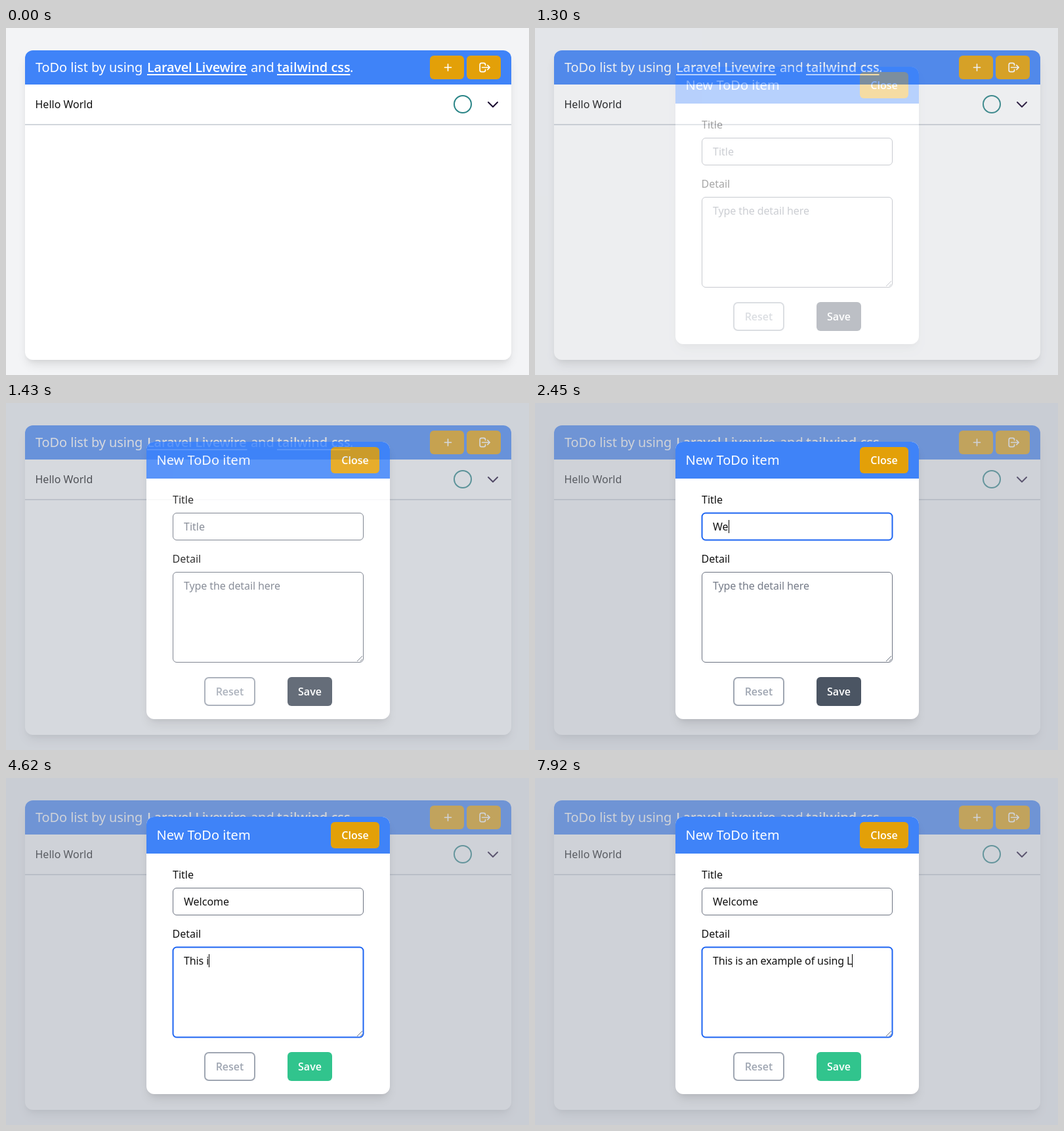
Write an HTML page that moves like this. It is 797x528 px and loops after 8000 ms.

```html
<!DOCTYPE html>
<html lang="en">
<head>
<meta charset="utf-8">
<title>ToDo list</title>
<style>
  html, body { margin: 0; width: 100%; height: 100%; overflow: hidden; background: #f3f4f6; }
  .panel, .shade, svg { position: absolute; }
  .panel {
    background: #fff; border-radius: 12px;
    box-shadow: 0 10px 15px -3px rgba(0,0,0,.1), 0 4px 6px -2px rgba(0,0,0,.05);
  }
  .list { left: 29px; top: 34px; width: 741px; height: 471px; }
  .form { left: 214px; top: 59px; width: 371px; height: 422px; }
  .shade { inset: 0; background: #9fa6b2; opacity: .5; }
  #dialog { position: absolute; inset: 0; opacity: 0; }
  svg { left: 0; top: 0; }
  text { font: 16px "Noto Sans", "Open Sans", sans-serif; white-space: pre; fill: #111; }
  .big { font-size: 20px; fill: #fff; }
  .big.run { letter-spacing: -.1px; }
  .link, .label { font-family: "Open Sans", "Noto Sans", sans-serif; font-weight: 600; }
  .label { fill: #fff; text-anchor: middle; }
  .hint { fill: #757b88; }
  .long { letter-spacing: -.1px; }
  .blue { fill: #3f83f8; }
  .amber { fill: #e3a008; }
  .icon { fill: none; stroke: #fff; stroke-width: 2; stroke-linecap: round; stroke-linejoin: round; }
  .field { fill: #fff; stroke: #6b7280; }
  .field.focus { stroke: #1c64f2; stroke-width: 2; }
</style>
</head>
<body>
<div class="panel list"></div>
<svg width="797" height="528">
  <path class="blue" d="M29 86V46a12 12 0 0 1 12-12H758a12 12 0 0 1 12 12V86z"/>
  <text class="big run" x="45" y="67">ToDo list by using</text>
  <text class="big link" x="215" y="67" style="letter-spacing:-.25px">Laravel Livewire</text>
  <text class="big run" x="373" y="67">and</text>
  <text class="big link" x="413" y="67" style="letter-spacing:-.05px">tailwind css</text>
  <text class="big" x="524" y="67">.</text>
  <path d="M215 71H367.5M413 71H524.5" stroke="#fff" stroke-width="2"/>
  <rect class="amber" x="646" y="42" width="52" height="36" rx="6"/>
  <rect class="amber" x="702" y="42" width="52" height="36" rx="6"/>
  <path class="icon" transform="translate(663.5 50) scale(.8333)" d="M12 6v12M6 12h12"/>
  <path class="icon" transform="translate(719.7 50) scale(.8333)"
    d="M17 16l4-4-4-4m4 4H7m6 4v1a3 3 0 0 1-3 3H6a3 3 0 0 1-3-3V7a3 3 0 0 1 3-3h4a3 3 0 0 1 3 3v1"/>
  <text x="44.5" y="122">Hello World</text>
  <circle cx="696" cy="116" r="13" fill="none" stroke="#2a8587" stroke-width="2"/>
  <path class="icon" style="stroke:#1a0830" d="M735 113l7 7 7-7"/>
  <rect x="29" y="146" width="741" height="2" fill="#d2d6dc"/>
</svg>

<div id="dialog">
  <div class="shade"></div>
  <div class="panel form"></div>
  <svg width="797" height="528">
    <path class="blue" d="M214 115V71a12 12 0 0 1 12-12H573a12 12 0 0 1 12 12V115z"/>
    <text class="big" x="229.5" y="94">New ToDo item</text>
    <rect class="amber" x="495" y="67" width="74" height="40" rx="6"/>
    <text class="label" x="532" y="93">Close</text>
    <text x="254" y="153">Title</text>
    <rect id="titleBox" class="field" x="254.5" y="167.5" width="290" height="41" rx="5.5"/>
    <text id="title" x="271" y="194"></text>
    <text x="253.5" y="243">Detail</text>
    <rect id="detailBox" class="field" x="254.5" y="257.5" width="290" height="137" rx="5.5"/>
    <text id="detail" class="long" x="271" y="284"></text>
    <path d="M535 393l8-8M540 393l3-3" stroke="#6b7280"/>
    <rect x="303" y="418" width="76" height="42" rx="6" fill="#fff" stroke="#9fa6b2" stroke-width="2"/>
    <text class="label" x="341" y="445" style="fill:#9fa6b2">Reset</text>
    <rect id="save" x="429" y="417" width="68" height="44" rx="6"/>
    <text class="label" x="463" y="445">Save</text>
    <rect id="caret" width="1" height="20" fill="#000"/>
  </svg>
</div>

<script>
const LOOP = 8000, FADE_START = 1207, FADE_END = 1607;
const FOCUS_TITLE = 1490, FOCUS_DETAIL = 3460, BLINK = 500, SAVE_READY = 2560;
const $ = id => document.getElementById(id);

// One key press time per character.
const fields = {
  title: {
    value: 'Welcome', hint: 'Title', y: 178,
    keys: [2270, 2450, 2560, 2700, 2760, 2830, 3230]
  },
  detail: {
    value: 'This is an example of using L', hint: 'Type the detail here', y: 268,
    keys: [3860, 3950, 4040, 4150, 4310, 4620, 4720, 4940, 5240, 5280,
           5430, 5560, 5740, 5920, 6000, 6150, 6320, 6410, 6500,
           6650, 6730, 6810, 6980, 7090, 7190, 7300, 7400, 7510, 7920]
  }
};

const fade = $('dialog').animate([
  { opacity: 0, offset: 0 },
  { opacity: 0, offset: FADE_START / LOOP, easing: 'ease' },
  { opacity: 1, offset: FADE_END / LOOP },
  { opacity: 1, offset: 1 }
], { duration: LOOP, fill: 'both' });
fade.pause();

function drawField(id, t, focused) {
  const { value, hint, keys } = fields[id];
  const count = keys.filter(k => k <= t).length;
  const text = $(id);
  text.textContent = count ? value.slice(0, count) : hint;
  text.classList.toggle('hint', !count);
  $(id + 'Box').classList.toggle('focus', focused);
  return count;
}

function drawCaret(id, count, t, focusTime) {
  const { keys, y } = fields[id];
  const since = t - (count ? keys[count - 1] : focusTime);
  const width = count ? $(id).getComputedTextLength() : 0;
  const caret = $('caret');
  caret.setAttribute('x', Math.round(271 + width));
  caret.setAttribute('y', y);
  caret.style.opacity = since >= 0 && since % (2 * BLINK) < BLINK ? 1 : 0;
}

function render(t) {
  fade.currentTime = t;
  const onDetail = t >= FOCUS_DETAIL;
  const titleCount = drawField('title', t, t >= FOCUS_TITLE && !onDetail);
  const detailCount = drawField('detail', t, onDetail);
  if (onDetail) drawCaret('detail', detailCount, t, FOCUS_DETAIL);
  else drawCaret('title', titleCount, t, FOCUS_TITLE);
  $('save').setAttribute('fill', t >= SAVE_READY ? '#31c48d' : '#4b5563');
}

const start = performance.now();
function tick() {
  render((performance.now() - start) % LOOP);
  requestAnimationFrame(tick);
}
tick();
</script>
</body>
</html>
```
